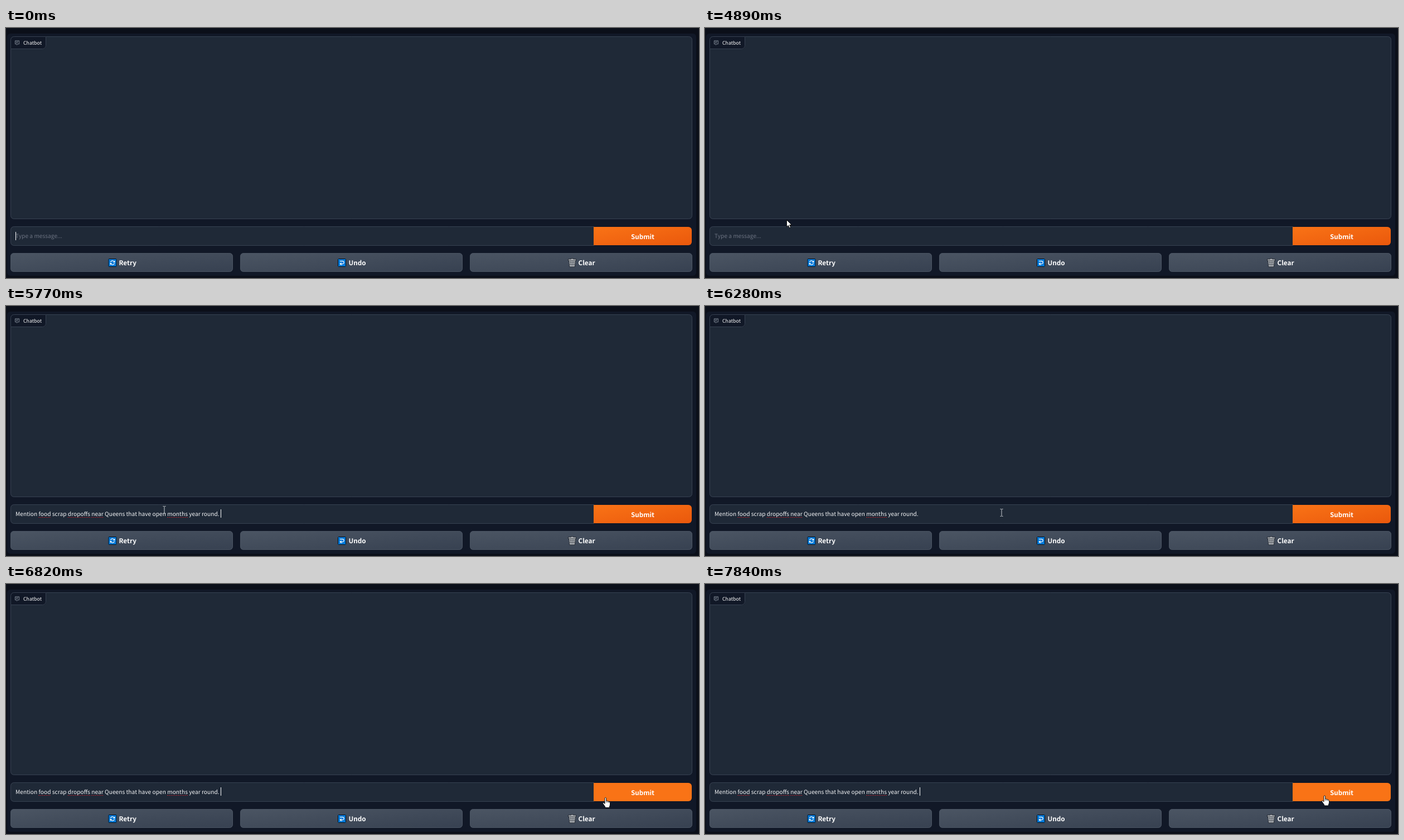
An HTML page with a canvas that plays this animation: 1243 by 450 pixels, repeating every 7.99 s.

```html
<!DOCTYPE html>
<html lang="en">
<head>
<meta charset="utf-8">
<title>Chatbot</title>
<style>
  html, body { margin: 0; width: 100%; height: 100%; overflow: hidden; background: #0b0f19; }
  canvas { display: block; width: 1243px; height: 450px; }
</style>
</head>
<body>
<canvas id="stage" width="1243" height="450"></canvas>
<script>
const ctx = document.getElementById('stage').getContext('2d');
const LOOP = 7990;
const FONT = '"Noto Sans CJK JP", "Noto Sans CJK SC", "Noto Sans CJK", "Open Sans", sans-serif';
const MESSAGE = 'Mention food scrap dropoffs near Queens that have open months year round.';
const MISSPELLED = ['food', 'dropoffs', 'near', 'months'];
const PASTE = 5770, HOVER = 6820;

// [start, visible]
const CARET = [
  [0, true], [530, false], [1060, true], [1460, false], [5490, true],
  [6280, false], [6700, true], [7220, false], [7840, true]
];

// [start, shape, x, y]
const POINTER = [
  [0, 'none', 0, 0],
  [4890, 'arrow', 146, 345],
  [5010, 'beam', 222, 366],
  [5130, 'beam', 292, 371],
  [5250, 'beam', 330, 373],
  [5370, 'beam', 304, 369],
  [5490, 'beam', 284, 367],
  [5890, 'beam', 301, 368],
  [6010, 'beam', 353, 370],
  [6130, 'beam', 438, 371],
  [6280, 'beam', 532, 372],
  [6400, 'beam', 640, 372],
  [6550, 'beam', 856, 368],
  [6700, 'beam', 1025, 385],
  [6820, 'hand', 1070, 384],
  [6940, 'hand', 1105, 380],
  [7370, 'hand', 1106, 380.5]
];

const ARROW = new Path2D('M.5.5V13L3.4 10.3L5.4 14.8L7.6 13.8L5.6 9.5H9.5Z');
const HAND = new Path2D('M4 1.6C4 .2 6.6 .2 6.6 1.6V6.4C7.5 6 8.8 6.3 9 7.2' +
  'C10 6.8 11.2 7.2 11.3 8.1C12.4 7.8 13.5 8.5 13.5 9.6V13C13.5 15 12.2 16 12.2 18.5' +
  'H5C5 16.5 2.5 14 .6 11C-.1 9.6 1.6 8.8 2.6 9.9L4 11.5Z');

const at = (track, t) => track.findLast(step => step[0] <= t);

function box(x, y, w, h, radius, fill, border) {
  ctx.beginPath();
  ctx.roundRect(x, y, w, h, radius);
  ctx.fillStyle = fill;
  ctx.fill();
  if (!border) return;
  ctx.beginPath();
  ctx.roundRect(x + .5, y + .5, w - 1, h - 1, radius);
  stroke(border, 1);
}

function stroke(color, width, path) {
  ctx.strokeStyle = color;
  ctx.lineWidth = width;
  path ? ctx.stroke(path) : ctx.stroke();
}

function label(text, x, y, size, color, weight = 400) {
  ctx.font = `${weight} ${size}px ${FONT}`;
  ctx.fillStyle = color;
  ctx.fillText(text, x, y);
}

// Same geometry as the CSS "to bottom right" gradient.
function cornerGradient(x, y, w, h, from, to) {
  const k = w * h / (w * w + h * h), cx = x + w / 2, cy = y + h / 2;
  const g = ctx.createLinearGradient(cx - h * k, cy - w * k, cx + h * k, cy + w * k);
  g.addColorStop(0, from);
  g.addColorStop(1, to);
  return g;
}

function button(x, w, text, textX) {
  box(x, 405, w, 34, 6, cornerGradient(x, 405, w, 34, '#4b5563', '#374151'), '#4b5563');
  label(text, textX, 427.3, 11.7, '#fff', 600);
}

function retryIcon() {
  box(183.5, 415, 15, 15, 1, '#0078d7', '#0a0d12');
  ctx.beginPath();
  ctx.arc(191, 422.5, 3.6, Math.PI * 1.08, Math.PI * 1.82);
  stroke('#fff', 1.2);
  ctx.beginPath();
  ctx.arc(191, 422.5, 3.6, Math.PI * .08, Math.PI * .82);
  stroke('#fff', 1.2);
  ctx.fillStyle = '#fff';
  ctx.fill(new Path2D('M195.4 418.5V422H191.9ZM186.6 426.5V423H190.1Z'));
}

function undoIcon() {
  box(595, 415, 15, 15, 1, '#0078d7', '#0a0d12');
  stroke('#fff', 1.2, new Path2D(
    'M599 419.6H603.6A2.5 2.5 0 0 1 603.6 424.6H599.4M601.6 422.4L599.3 424.6L601.6 426.8'));
}

function trashIcon() {
  const bin = new Path2D('M1010 418.5H1021L1019.8 429.5H1011.2Z');
  const lid = new Path2D('M1009 416.5H1013.5V415.5H1017.5V416.5H1022V418.5H1009Z');
  for (const part of [bin, lid]) {
    stroke('#14181e', 1.4, part);
    ctx.fillStyle = '#b4b8bd';
    ctx.fill(part);
  }
  stroke('#4c5158', .8, new Path2D(
    'M1012.5 419.5L1013 428.5M1015.5 419.5V428.5M1018.5 419.5L1018 428.5M1011 422H1020M1011 425.5H1020'));
}

function chatIcon() {
  stroke('#8b93a0', .9, new Path2D(
    'M16.5 22.9H23.6V28.8H20.8L19.5 30.5L18.4 28.8H16.5ZM18 24.9H22M18 26.8H20.8'));
}

function message() {
  label(MESSAGE, 17, 378, 10.22, '#f3f4f6');
  ctx.setLineDash([1.7, 1.5]);
  for (const word of MISSPELLED) {
    const x = 17 + ctx.measureText(MESSAGE.slice(0, MESSAGE.indexOf(word))).width;
    ctx.beginPath();
    ctx.moveTo(x, 380.5);
    ctx.lineTo(x + ctx.measureText(word).width, 380.5);
    stroke('#c51f2b', 1);
  }
  ctx.setLineDash([]);
}

function pointer(shape, x, y) {
  ctx.save();
  ctx.translate(x, y);
  ctx.lineJoin = 'round';
  if (shape === 'beam') {
    stroke('#c9cdd2', 1, new Path2D('M-2.5-6.5H-.5M.5-6.5H2.5M0-6V6M-2.5 6.5H-.5M.5 6.5H2.5'));
  } else if (shape !== 'none') {
    const path = shape === 'arrow' ? ARROW : HAND;
    ctx.fillStyle = '#fff';
    ctx.fill(path);
    stroke('#000', .9, path);
    if (shape === 'hand') stroke('#000', .7, new Path2D('M6.6 6.4V9.5M9 7.2V9.7M11.3 8.1V10'));
  }
  ctx.restore();
}

function draw(t) {
  ctx.fillStyle = '#0b0f19';
  ctx.fillRect(0, 0, 1243, 450);
  box(2, 10, 1236, 436, 6, '#111827');

  box(8, 15, 1223, 329, 6, '#1f2937', '#374151');
  box(8, 15, 64, 23, [6, 0, 6, 0], '#111827', '#374151');
  chatIcon();
  label('Chatbot', 31, 30, 8.8, '#fff');

  const pasted = t >= PASTE;
  box(8, 357, 1047, 35, [6, 0, 0, 6], '#1f2937', '#374151');
  if (pasted) message();
  else label('Type a message...', 17, 378, 10.22, '#6b7280');
  if (at(CARET, t)[1]) {
    ctx.fillStyle = '#fff';
    ctx.fillRect(pasted ? 385 : 17, pasted ? 366 : 367, 1, 15);
  }

  const orange = t >= HOVER ? '#f97316' : cornerGradient(1054, 358, 176, 33, '#f97316', '#ea580c');
  box(1054, 358, 176, 33, [0, 6, 6, 0], orange);
  ctx.textAlign = 'center';
  label('Submit', 1142, 379.5, 11.7, '#fff', 600);
  ctx.textAlign = 'left';

  button(8, 399, 'Retry', 202.5);
  button(420, 399, 'Undo', 614.5);
  button(832, 399, 'Clear', 1026.5);
  retryIcon();
  undoIcon();
  trashIcon();

  pointer(...at(POINTER, t).slice(1));
}

ctx.textRendering = 'geometricPrecision';
const start = performance.now();
function tick() {
  draw((performance.now() - start) % LOOP);
  requestAnimationFrame(tick);
}
tick();
</script>
</body>
</html>
```
